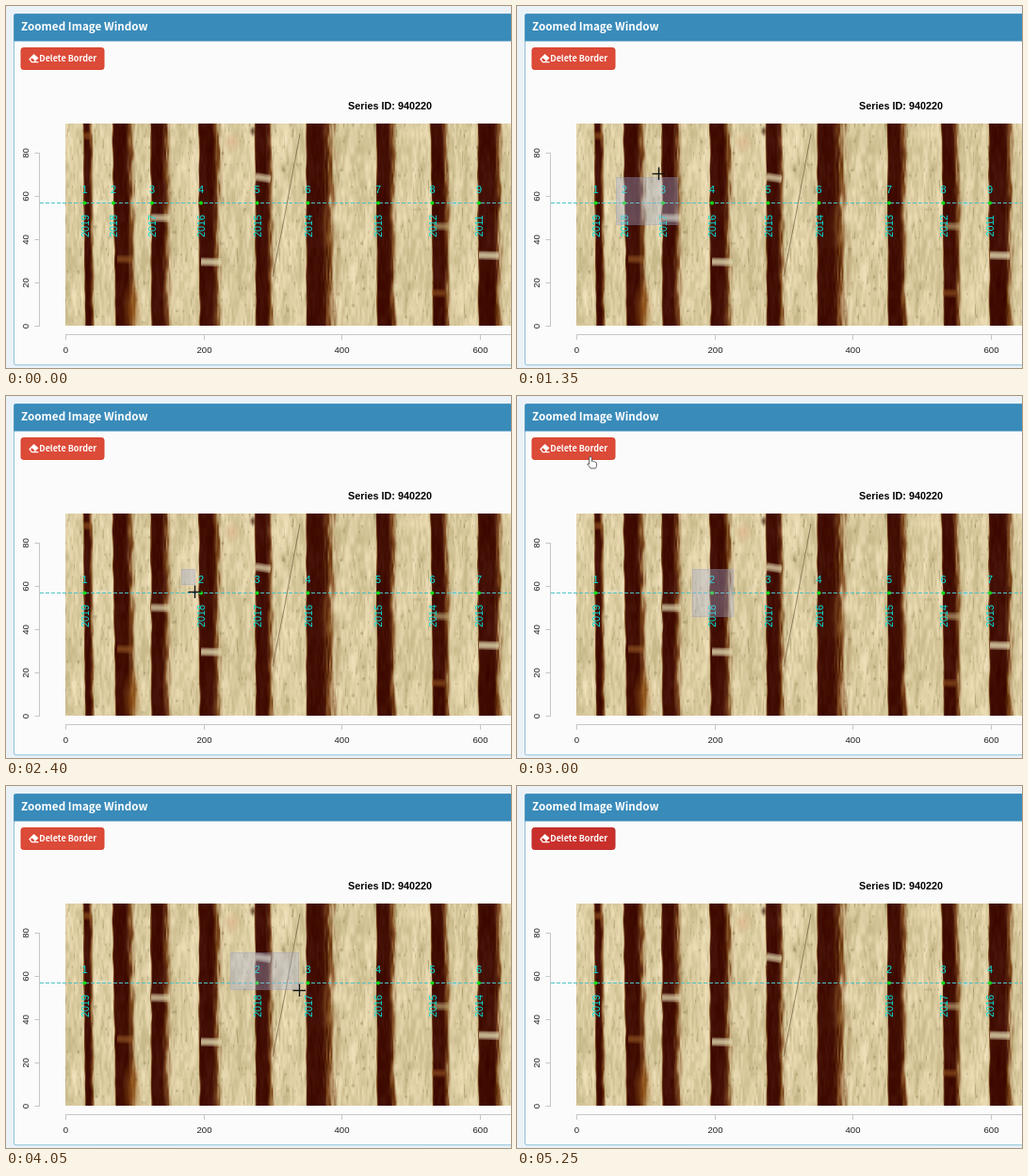
Animation, 536 px wide and 385 px high, one loop 5400 ms. Source, as an HTML page with a canvas:

```html
<!DOCTYPE html>
<html lang="en">
<head>
<meta charset="utf-8">
<title>Zoomed Image Window</title>
<style>
  html, body { margin: 0; width: 100%; height: 100%; overflow: hidden; background: #eaf2f7; }
  canvas { display: block; }
</style>
</head>
<body>
<canvas id="stage" width="536" height="385"></canvas>
<script>
const W = 536, H = 385, LOOP = 5400, STEP = 150;
const ctx = document.getElementById('stage').getContext('2d');
const UI = '"Noto Sans CJK SC", "Noto Sans CJK JP", "Noto Sans CJK", "Open Sans", sans-serif';
const PLOT = '"Liberation Sans", Arial, sans-serif';
const WOOD = { x: 63, y: 125, w: 473, h: 215 };
const LINE_Y = 209.5;

// Ring borders along the measuring line, left to right
const borders = [83.5, 114, 155, 207, 266.5, 320.5, 395, 452.5, 502];

// Dark rings: left edge, core width, fade width, slant over the height
const rings = [
  [81.5, 7, 4, 2], [112, 15, 9, 4], [153, 13, 9, 1], [204, 15, 10, 1], [263.5, 13, 8, 1],
  [318, 17, 17, 0], [392.5, 14, 8, 1], [450, 13, 7, 3], [500, 18, 9, 1]
];

const lerp = (a, b, k) => a + (b - a) * k;
const clamp = v => Math.max(0, Math.min(1, v));
const smooth = v => { v = clamp(v); return v * v * (3 - 2 * v); };

function hash(x, y) {
  const s = Math.sin(x * 127.1 + y * 311.7) * 43758.5453;
  return s - Math.floor(s);
}

function noise(x, y) {
  const ix = Math.floor(x), iy = Math.floor(y);
  const fx = smooth(x - ix), fy = smooth(y - iy);
  return lerp(lerp(hash(ix, iy), hash(ix + 1, iy), fx),
              lerp(hash(ix, iy + 1), hash(ix + 1, iy + 1), fx), fy);
}

function ringDepth(x, y) {
  const v = (y - WOOD.y) / WOOD.h;
  let depth = 0;
  for (const [left, core, fade, slant] of rings) {
    const dx = x - left - slant * v - (noise(left, y / 16) - 0.5);
    if (dx < -2 || dx > core + fade * 1.5 + 4) continue;
    const soft = fade * (0.8 + 0.5 * noise(left + x / 4, y / 28));
    depth = Math.max(depth, smooth((dx + 1) / 2.5) * (1 - smooth((dx - core + 2) / (soft + 2))));
  }
  // Streaks break up the soft sides only
  return clamp(depth + (noise(x / 1.7 + 20, y / 13) - 0.5) * 2.4 * depth * (1 - depth));
}

function makeWood() {
  const c = document.createElement('canvas');
  c.width = WOOD.w;
  c.height = WOOD.h;
  const g = c.getContext('2d');
  const img = g.createImageData(WOOD.w, WOOD.h);
  const pale = [219, 204, 161], brown = [132, 80, 36], dark = [65, 13, 2];
  for (let j = 0, p = 0; j < WOOD.h; j++) {
    for (let i = 0; i < WOOD.w; i++, p += 4) {
      const x = i + WOOD.x, y = j + WOOD.y;
      const d = ringDepth(x, y);
      const grain = (noise(x / 2, y / 9) - 0.5) * 28 + (noise(x / 8 + 50, y / 35) - 0.5) * 22;
      const fleck = Math.max(0, noise(x / 1.8 + 90, y / 6) - 0.8) * 190;
      for (let k = 0; k < 3; k++) {
        const base = d < 0.5 ? lerp(pale[k], brown[k], d * 2) : lerp(brown[k], dark[k], d * 2 - 1);
        const weight = lerp(1, 0.4, d) * (k === 2 ? 1.2 : 1);
        img.data[p + k] = base + grain * weight - fleck * (1 - d);
      }
      img.data[p + 3] = 255;
    }
  }
  g.putImageData(img, 0, 0);
  g.translate(-WOOD.x, -WOOD.y);

  const stain = (x, y, rx, ry, rgb, a) => {
    g.save();
    g.translate(x, y);
    g.scale(rx, ry);
    const f = g.createRadialGradient(0, 0, 0, 0, 0, 1);
    f.addColorStop(0, `rgba(${rgb},${a})`);
    f.addColorStop(1, `rgba(${rgb},0)`);
    g.fillStyle = f;
    g.fillRect(-1, -1, 2, 2);
    g.restore();
  };
  stain(134, 322, 11, 36, '150,88,24', 0.75);
  stain(341, 235, 10, 30, '125,70,22', 0.4);
  stain(240, 145, 10, 12, '222,150,110', 0.35);
  stain(262, 133, 4, 6, '70,35,15', 0.8);
  stain(476, 210, 6, 4, '190,225,225', 0.7);
  stain(102, 208, 12, 3, '225,232,210', 0.7);

  const streak = (x1, y1, x2, y2, rgb, a) => {
    g.strokeStyle = `rgba(${rgb},${a})`;
    for (const w of [9, 6, 3]) {
      g.lineWidth = w;
      g.beginPath();
      g.moveTo(x1, y1);
      g.lineTo(x2, y2);
      g.stroke();
    }
  };
  const cream = '222,210,170', rust = '150,88,35';
  streak(265, 181.5, 281, 184, cream, 0.4);
  streak(154, 225, 174, 225.5, cream, 0.38);
  streak(207, 272, 229, 272.5, cream, 0.45);
  streak(502, 265, 523, 265.5, cream, 0.45);
  streak(454, 234, 470, 234.5, '190,165,115', 0.3);
  streak(118, 269, 134, 269.5, rust, 0.3);
  streak(452, 305, 466, 305.5, rust, 0.25);
  streak(83, 138, 90, 138, rust, 0.25);

  g.strokeStyle = 'rgba(95,75,45,0.6)';
  g.lineWidth = 1;
  g.beginPath();
  g.moveTo(312, 136);
  g.lineTo(296, 222);
  g.lineTo(283, 288);
  g.stroke();
  return c;
}

const wood = makeWood();

function line(x1, y1, x2, y2) {
  ctx.beginPath();
  ctx.moveTo(x1, y1);
  ctx.lineTo(x2, y2);
  ctx.stroke();
}

function shape(points, fill) {
  ctx.beginPath();
  for (const [x, y] of points) ctx.lineTo(x, y);
  ctx.fillStyle = fill;
  ctx.fill();
}

function label(str, x, y, font, color, align = 'center', turned = false) {
  ctx.save();
  ctx.translate(x, y);
  if (turned) ctx.rotate(-Math.PI / 2);
  ctx.font = font;
  ctx.fillStyle = color;
  ctx.textAlign = align;
  ctx.fillText(str, 0, 0);
  ctx.restore();
}

function drawPanel() {
  ctx.fillStyle = '#eaf2f7';
  ctx.fillRect(0, 0, W, H);
  ctx.beginPath();
  ctx.roundRect(8.5, 8.5, 560, 373.3, 2);
  ctx.fillStyle = '#fbfbfb';
  ctx.fill();
  ctx.strokeStyle = '#8fbfda';
  ctx.lineWidth = 1;
  ctx.stroke();
  ctx.fillStyle = '#398bba';
  ctx.beginPath();
  ctx.roundRect(8.3, 8.2, 560, 29.2, [2, 0, 0, 0]);
  ctx.fill();
  label('Zoomed Image Window', 16, 26, 'bold 11.7px ' + UI, '#fff', 'left');
}

function drawButton(state) {
  const fill = { idle: '#dc4a38', focus: '#c9302c', down: '#a92423' }[state];
  const edge = { idle: '#d9442f', focus: '#bb2d2a', down: '#6b3a58' }[state];
  ctx.beginPath();
  ctx.roundRect(16, 44.5, 88, 23, 2.5);
  ctx.fillStyle = fill;
  ctx.fill();
  ctx.strokeStyle = edge;
  ctx.lineWidth = 1;
  ctx.stroke();

  // Eraser icon
  shape([[24.2, 56.5], [29.5, 51], [34.5, 55.3], [31, 59], [34.5, 59], [34.5, 60.2], [27, 60.2]], '#fff');
  shape([[26, 56.7], [27.5, 55.3], [30.5, 58], [29.5, 59], [27.7, 59]], fill);
  label('Delete Border', 35.2, 59, 'bold 9px ' + UI, '#fff', 'left');
}

function drawPlot(removed) {
  label('Series ID: 940220', 407.5, 110, 'bold 10.8px ' + PLOT, '#000');
  ctx.drawImage(wood, WOOD.x, WOOD.y);

  ctx.strokeStyle = '#c8c5c7';
  ctx.lineWidth = 1;
  line(35.5, 157, 35.5, 341);
  line(63, 349.5, W, 349.5);
  const small = '9.6px ' + PLOT;
  for (let i = 0; i < 5; i++) {
    const y = 340.5 - i * 46;
    line(30.5, y, 36, y);
    label(i * 20, 24, y, small, '#222', 'center', true);
  }
  for (let i = 0; i < 4; i++) {
    const x = Math.round(63 + i * 146.6) + 0.5;
    line(x, 350, x, 355);
    label(i * 200, x, 368.5, small, '#222');
  }

  ctx.strokeStyle = '#4cc4c4';
  ctx.setLineDash([4, 2]);
  line(36, LINE_Y, W, LINE_Y);
  ctx.setLineDash([]);

  const kept = borders.filter((x, i) => i === 0 || i > removed);
  kept.forEach((x, i) => {
    ctx.fillStyle = '#12dc12';
    ctx.beginPath();
    ctx.arc(x, LINE_Y, 2, 0, 7);
    ctx.fill();
    label(i + 1, x, 199, '11px ' + PLOT, '#06e2dc');
    label(2019 - i, x + 4, 234, '10.8px ' + PLOT, '#06e2dc', 'center', true);
  });
}

function drawBrush(x1, y1, x2, y2) {
  ctx.fillStyle = 'rgba(165,175,220,0.36)';
  ctx.fillRect(x1, y1, x2 - x1, y2 - y1);
  ctx.strokeStyle = 'rgba(110,115,150,0.15)';
  ctx.lineWidth = 1;
  ctx.strokeRect(x1 + 0.5, y1 + 0.5, x2 - x1 - 1, y2 - y1 - 1);
}

const handShape = new Path2D('M-1.5 8V1Q-1.5-.5 0-.5Q1.5-.5 1.5 1V5Q3 4 3.6 5.2Q5 4.4 5.5 6Q7 5.6 7 7.5V10Q7 11.5 6 13H0Q-1 11-3.5 8.6Q-3.6 6.6-1.5 8Z');

function drawPointer(x, y) {
  x = Math.round(x);
  y = Math.round(y);
  if (y < 75) {
    ctx.save();
    ctx.translate(x, y + 1);
    ctx.scale(0.92, 0.92);
    ctx.fillStyle = '#fff';
    ctx.strokeStyle = '#444';
    ctx.lineWidth = 0.9;
    ctx.fill(handShape);
    ctx.stroke(handShape);
    ctx.restore();
  } else {
    ctx.strokeStyle = '#111';
    ctx.lineWidth = 1.4;
    line(x - 6.5, y + 0.5, x + 7, y + 0.5);
    line(x + 0.5, y - 6.5, x + 0.5, y + 7);
  }
}

// Pointer path: time, x, y
const path = [
  [450, 122, 168], [750, 105, 182], [900, 105, 182], [1200, 172, 233], [1350, 150, 178],
  [1650, 76, 64], [1800, 73, 64], [1950, 73, 64], [2250, 186, 184], [2400, 200, 208],
  [2700, 230, 235], [3000, 78, 64], [3300, 76, 64], [3600, 237, 177], [3750, 237, 177],
  [4200, 348, 237], [4500, 86, 64], [4650, 78, 62], [4950, 78, 62]
];

function pointerAt(t) {
  for (let i = 1; i < path.length; i++) {
    const [t0, x0, y0] = path[i - 1], [t1, x1, y1] = path[i];
    if (t >= t0 && t <= t1) {
      const k = (t - t0) / (t1 - t0);
      return [lerp(x0, x1, k), lerp(y0, y1, k)];
    }
  }
  return null;
}

// Each round: brush start, brush end, press, removal, then the box corners
const rounds = [
  [900, 1200, 1800, 1950, 105, 182, 171, 233],
  [2250, 2700, 3150, 3300, 186, 184, 230, 235],
  [3750, 4200, 4800, 4950, 238, 177, 348, 237]
];
const removedAfter = [0, 2, 3, 5];

function buttonState(t, round, done, pos) {
  if (!round) return 'focus';
  const [start, end, press] = round;
  if (t >= press) return 'down';
  const hover = pos && pos[1] < 65 && t > end + 300;
  return hover || (done && t < start) ? 'focus' : 'idle';
}

function draw(t) {
  const done = rounds.filter(r => t >= r[3]).length;
  const round = rounds[done];
  const pos = pointerAt(t);

  drawPanel();
  drawButton(buttonState(t, round, done, pos));
  drawPlot(removedAfter[done]);
  if (round && t > round[0]) {
    const [start, end, , , x1, y1, x2, y2] = round;
    const k = clamp((t - start) / (end - start));
    drawBrush(x1, y1, Math.round(lerp(x1, x2, k)), Math.round(lerp(y1, y2, k)));
  }
  if (pos) drawPointer(...pos);
}

let shown = -1;
const begin = performance.now();
function tick() {
  const t = Math.floor(((performance.now() - begin) % LOOP) / STEP) * STEP;
  if (t !== shown) draw(shown = t);
  requestAnimationFrame(tick);
}
tick();
</script>
</body>
</html>
```
